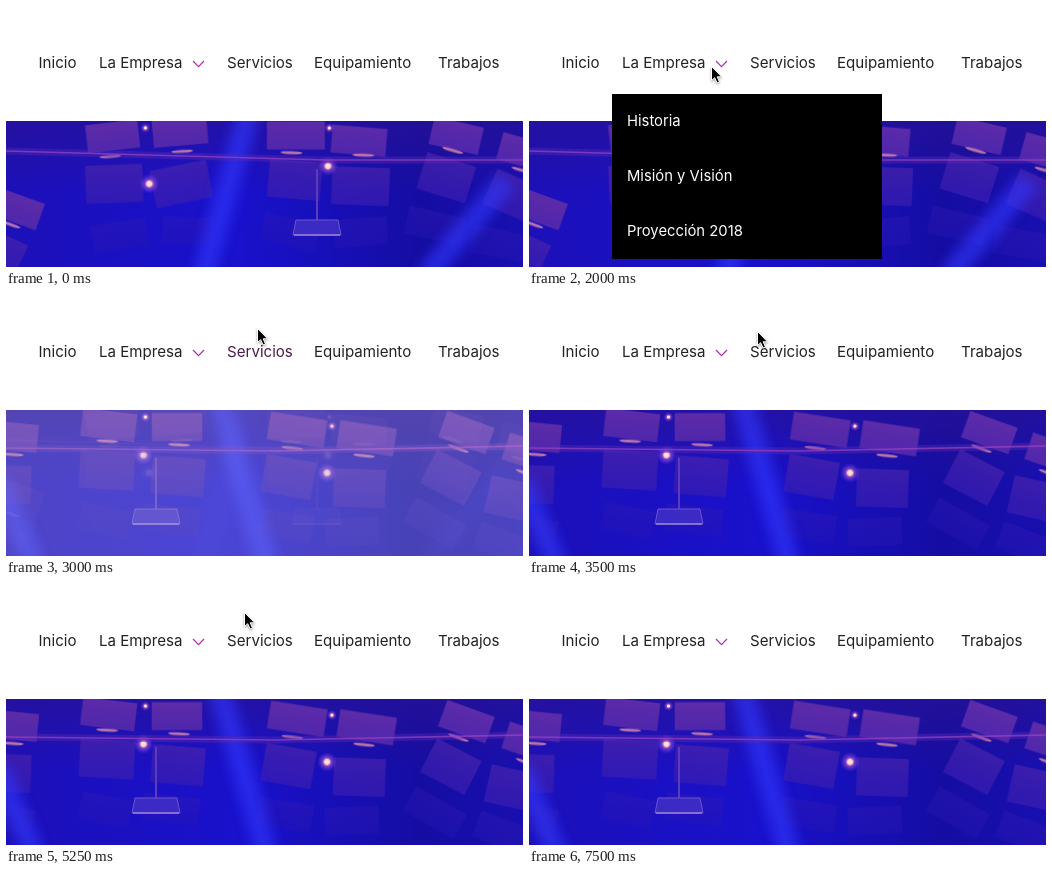
An HTML page that plays this animation: 517x261 px, repeating every 8 s.

```html
<!DOCTYPE html>
<html lang="es">
<head>
<meta charset="utf-8">
<title>Menú</title>
<style>
html, body { margin: 0; width: 100%; height: 100%; overflow: hidden; background: #fff; }
svg { display: block; }
text { font: 400 15.1px Inter, "Open Sans", sans-serif; fill: #222; }
.menu text { font-size: 14.8px; fill: #fff; }
.anim { animation: 8s step-end infinite; }
#sceneA { --from: 1; --to: 0; animation-name: fade; }
#sceneB { --from: 0; --to: 1; animation-name: fade; }
#menu { animation-name: menu; }
#link { animation-name: link; }
#next { animation-name: next; }
#cursor { animation-name: cursor; filter: drop-shadow(.5px 1.5px 1px #0006); }

@keyframes fade {
  0% { opacity: var(--from); }
  25% { opacity: var(--from); animation-timing-function: steps(6); }
  43.75%, 100% { opacity: var(--to); }
}
@keyframes menu {
  0%, 34.375%, 59.375%, 87.5%, 100% { visibility: hidden; }
  25%, 46.875%, 68.75% { visibility: visible; }
}
@keyframes link {
  0%, 37.5%, 65.625%, 93.75%, 100% { fill: #222; }
  28.125%, 62.5%, 90.625% { fill: #64205f; }
  31.25%, 50%, 71.875% { fill: #a3169f; }
}
@keyframes next {
  0%, 40.625%, 100% { fill: #222; }
  34.375% { fill: #4a1c48; }
}
@keyframes cursor {
  0%, 90.625%, 100% { transform: translate(-50px, -50px); }
  3.125% { transform: translate(279px, -9px); }
  6.25% { transform: translate(215px, 34px); }
  9.375% { transform: translate(176px, 54px); }
  12.5% { transform: translate(178px, 62px); }
  25% { transform: translate(182px, 60px); }
  34.375% { transform: translate(235px, 57px); }
  37.5% { transform: translate(251px, 33px); }
  40.625% { transform: translate(240px, 28px); }
  43.75% { transform: translate(228px, 36px); }
  46.875% { transform: translate(168px, 59px); }
  50% { transform: translate(158px, 57px); }
  59.375% { transform: translate(205px, 37px); }
  62.5% { transform: translate(242px, 26px); }
  65.625% { transform: translate(238px, 28px); }
  68.75% { transform: translate(177px, 56px); }
  71.875% { transform: translate(159px, 56px); }
  84.375% { transform: translate(171px, 50px); }
  87.5% { transform: translate(268px, 25px); }
}
</style>
</head>
<body>
<svg width="517" height="261" viewBox="0 0 517 261">
  <defs>
    <clipPath id="hero"><rect y="115" width="517" height="146"/></clipPath>
    <linearGradient id="base">
      <stop offset="0" stop-color="#1c10b8"/><stop offset=".45" stop-color="#1911cc"/>
      <stop offset=".8" stop-color="#150da2"/><stop offset="1" stop-color="#180fb0"/>
    </linearGradient>
    <linearGradient id="haze" x2="0" y2="1">
      <stop offset="0" stop-color="#2a1290" stop-opacity=".6"/>
      <stop offset=".5" stop-color="#2a1290" stop-opacity="0"/>
    </linearGradient>
    <linearGradient id="card" gradientUnits="userSpaceOnUse" x1="0" x2="0" y1="-20" y2="110">
      <stop offset="0" stop-color="#5e2ca8"/><stop offset="1" stop-color="#2616b6"/>
    </linearGradient>
    <radialGradient id="glow">
      <stop offset="0" stop-color="#fff4e4"/><stop offset=".25" stop-color="#ffc8c0"/>
      <stop offset=".45" stop-color="#d06ad8" stop-opacity=".5"/>
      <stop offset="1" stop-color="#8040f0" stop-opacity="0"/>
    </radialGradient>
    <filter id="soft" x="-60%" y="-20%" width="220%" height="140%"><feGaussianBlur stdDeviation="6"/></filter>
    <filter id="edge"><feGaussianBlur stdDeviation=".6"/></filter>
  </defs>

  <rect width="517" height="261" fill="#fff"/>
  <g clip-path="url(#hero)">
    <g id="sceneA" class="anim"></g>
    <g id="sceneB" class="anim"></g>
  </g>

  <text x="32.5" y="62">Inicio</text>
  <text id="link" class="anim" x="93" y="62">La Empresa</text>
  <path d="M187 55l5.5 5.7 5.5-5.7" fill="none" stroke="#b02bb0" stroke-width="1.2"/>
  <text id="next" class="anim" x="221" y="62">Servicios</text>
  <text x="308" y="62">Equipamiento</text>
  <text x="432" y="62">Trabajos</text>

  <g id="menu" class="menu anim">
    <rect x="83" y="88" width="270" height="165"/>
    <text x="98" y="120">Historia</text>
    <text x="98" y="175">Misión y Visión</text>
    <text x="98" y="230">Proyección 2018</text>
  </g>

  <g id="cursor" class="anim">
    <path d="M.5 .5V14.6L3.7 11.7 6.1 17 8.5 16 6.2 10.8H10.6Z" stroke="#fff"/>
  </g>
</svg>
<script>
function add(parent, tag, attrs) {
  const node = document.createElementNS('http://www.w3.org/2000/svg', tag);
  for (const k in attrs) node.setAttribute(k, attrs[k]);
  return parent.appendChild(node);
}

// Seeded spread in -1..1
function jitter(seed) {
  return () => {
    seed = seed * 16807 % 2147483647;
    return seed / 1073741823.5 - 1;
  };
}

// Two columns of hanging panels with a glint under each top one
function cluster(root, { x, y, tilt, lamp }, rnd) {
  const g = add(root, 'g', { transform: `translate(${x} ${y}) rotate(${tilt})` });
  for (let row = 0; row < 3; row++) {
    for (const side of [-1, 1]) {
      const w = 54 + 4 * rnd(), h = row === 1 ? 38 : 28;
      const cx = side * 34 + 3 * rnd(), cy = row * 47 + 3 * rnd();
      add(g, 'rect', { x: cx - w / 2, y: cy - h / 2, width: w, height: h, fill: 'url(#card)',
        opacity: 1 - row * .3, filter: 'url(#edge)',
        transform: `rotate(${(4 + row * 4) * rnd()} ${cx} ${cy})` });
      if (row === 0)
        add(g, 'ellipse', { cx: side * 36, cy: 17, rx: 11, ry: 1.6, fill: '#e08aa8',
          opacity: .8, filter: 'url(#edge)' });
    }
  }
  if (!lamp) return;
  add(g, 'circle', { cx: 1, cy: lamp, r: 10, fill: 'url(#glow)' });
  add(g, 'circle', { cx: 1, cy: -9, r: 5, fill: 'url(#glow)' });
}

function stand(root, x) {
  add(root, 'path', { d: `M${x} 163V214`, stroke: '#5c3cbc', 'stroke-width': 2 });
  add(root, 'path', { d: `M${x - 21} 214h42l3 15h-48z`, fill: '#3c2ac4', stroke: '#6a54cc' });
  add(root, 'path', { d: `M${x - 23} 229h46`, stroke: '#9a80d8', 'stroke-width': 1.5 });
}

function build(id, { seed, beams, clusters, bar, standX }) {
  const root = document.getElementById(id);
  const rnd = jitter(seed);
  const full = { y: 115, width: 517, height: 146 };
  add(root, 'rect', { ...full, fill: 'url(#base)' });
  add(root, 'rect', { ...full, fill: 'url(#haze)' });
  for (const c of clusters) cluster(root, c, rnd);
  for (const d of beams)
    add(root, 'path', { d, fill: 'none', stroke: '#3038ff', 'stroke-width': 22, opacity: .6, filter: 'url(#soft)' });
  add(root, 'path', { d: bar, fill: 'none', stroke: '#5a28b0', 'stroke-width': 7, opacity: .4 });
  add(root, 'path', { d: bar, fill: 'none', stroke: '#9a44c4', 'stroke-width': 1.6, opacity: .7 });
  stand(root, standX);
}

build('sceneA', {
  seed: 11,
  beams: ['M244 100L196 275', 'M500 175L420 270'],
  clusters: [
    { x: -24, y: 190, tilt: 20 },
    { x: 139, y: 131, tilt: -4, lamp: 47 },
    { x: 322, y: 131, tilt: 2, lamp: 29 },
    { x: 486, y: 138, tilt: 16 }
  ],
  bar: 'M0 145L320 154H517',
  standX: 311
});

build('sceneB', {
  seed: 29,
  beams: ['M212 100L262 275', 'M-8 185L28 270'],
  clusters: [
    { x: -28, y: 140, tilt: 4 },
    { x: 138, y: 131, tilt: 3, lamp: 29 },
    { x: 324, y: 140, tilt: 6, lamp: 38 },
    { x: 492, y: 150, tilt: 20 }
  ],
  bar: 'M0 153L270 156 517 151',
  standX: 150
});
</script>
</body>
</html>
```
